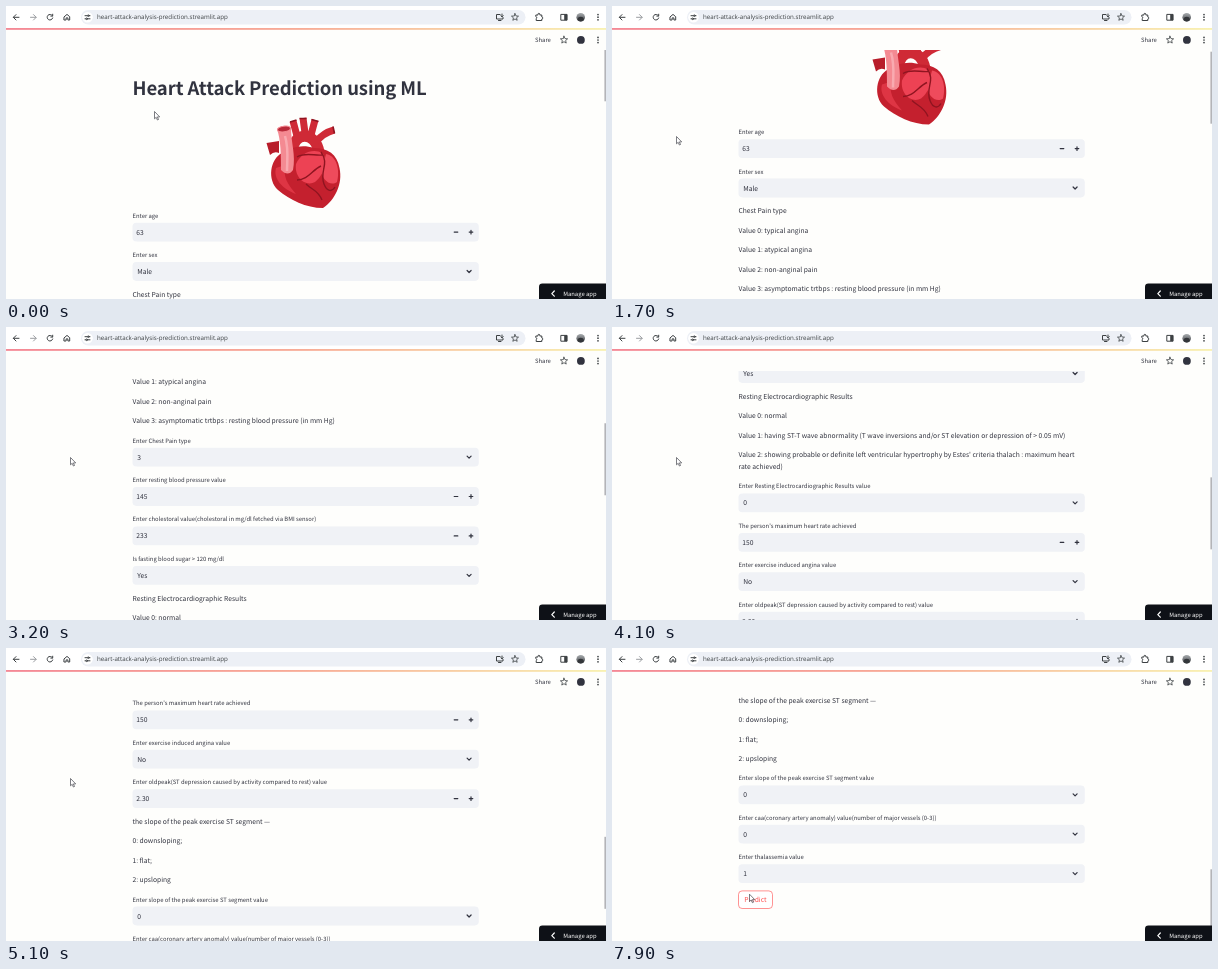
These frames come from a looping animation (600x293 px, 8 s). An HTML page:

```html
<!DOCTYPE html>
<html lang="en">
<head>
<meta charset="utf-8">
<title>Prediction form</title>
<style>
  html, body { margin: 0; width: 100%; height: 100%; overflow: hidden; background: #fefefc; }
  svg { display: block; width: 600px; height: 293px; }
  text {
    font-family: "Noto Sans CJK JP", "Noto Sans CJK SC", "Noto Sans CJK KR", "Open Sans", sans-serif;
    fill: #31333f; text-rendering: geometricPrecision; white-space: pre;
  }
  .h1 { font-size: 18.51px; font-weight: 700; letter-spacing: -.09px; }
  .body { font-size: 6.73px; }
  .label { font-size: 5.89px; }
  .url { font: 6.19px "Open Sans", "Noto Sans", sans-serif; fill: #3c4043; }
  .light { fill: #fff; font-weight: 500; }
  .line { fill: none; stroke: #3c4043; stroke-width: 1; stroke-linecap: round; stroke-linejoin: round; }
  .mark { fill: none; stroke: #31333f; stroke-width: 1.2; stroke-linecap: round; stroke-linejoin: round; }
  #button rect { fill: #fff; stroke: #d9dade; stroke-width: .6; }
  #button.hover rect { stroke: #ff4b4b; }
  #button.hover text { fill: #ff4b4b; }
</style>
</head>
<body>
<svg viewBox="0 0 600 293">
  <defs>
    <linearGradient id="stripe">
      <stop offset="0" stop-color="#f0566a"/>
      <stop offset=".5" stop-color="#f58a6c"/>
      <stop offset="1" stop-color="#f6ec93"/>
    </linearGradient>
    <linearGradient id="photo" x2="0" y2="1">
      <stop offset="0" stop-color="#a9adb0"/>
      <stop offset="1" stop-color="#45484c"/>
    </linearGradient>
  </defs>
  <rect width="600" height="293" fill="#fefefc"/>

  <g id="page">
    <text class="h1" x="126.5" y="89.2">Heart Attack Prediction using ML</text>
    <g id="heart" fill="none" stroke-linecap="butt">
      <path d="M286 146C287 126 309 124 313 146" stroke="#cf2a36" stroke-width="11"/>
      <path d="M291 130L287 115M299 127L297 112M305 129L309 114M310 136Q317 127 328 124" stroke="#cf2a36" stroke-width="7"/>
      <path d="M284 116l6.500-2M293.500 112.500h7M305.500 113.500l7 2M327 120.500l1.500 7" stroke="#8f1420" stroke-width="1.6"/>
      <path d="M260.500 137L273 135V147Q268 145 264 149Z" fill="#b81d2a"/>
      <path d="M276 147C264 153 261 174 272 184C284 194 300 202 317 202C329 194 337 178 333.500 162C331 148 322 142 308 142C295 138 284 142 276 147Z" fill="#c4202e"/>
      <path d="M290 158C295 146 308 142 316 147C323 153 318 169 309 176C300 181 288 172 290 158Z" fill="#ed4254"/>
      <path d="M320 148C331 150 334 164 331 176C324 181 315 173 316 164Z" fill="#ef4b5c"/>
      <path d="M270 162C267 172 276 183 290 188C281 178 277 170 279 159Z" fill="#de3544"/>
      <path d="M315 146C324 158 313 165 318 178C321 186 326 186 329 181M291 174C302 174 306 164 315 160M300 178C306 184 312 184 316 194M291 151C299 146 309 150 316 149" stroke="#8f1420" stroke-width="1.4"/>
      <path d="M271 123C275 134 275 151 275 164Q282 171 287 164C290 149 285 137 285 122Q278 117 271 123Z" fill="#f48a92"/>
      <path d="M279 130C283 143 281 154 281 165" stroke="#f9aab0" stroke-width="2.500"/>
      <ellipse cx="278" cy="123" rx="6.500" ry="2.800" fill="#b92a39" stroke="#f48a92" transform="rotate(-8 278 123)"/>
    </g>
    <g id="form"></g>
    <g id="button">
      <rect x="126.500" y="981.700" width="34" height="17.600" rx="3.600"/>
      <text class="body" x="132.200" y="993">Predict</text>
    </g>
  </g>

  <rect id="thumb" x="598.400" width="1.600" height="72" fill="#b3b4b8"/>
  <rect y="22" width="600" height="22" fill="#fefefc"/>
  <rect width="600" height="22" fill="#fff"/>
  <rect y="22.300" width="600" height="1.300" fill="url(#stripe)"/>

  <rect x="75" y="4" width="444.500" height="14.500" rx="7.250" fill="#edf0f6"/>
  <circle cx="81.500" cy="11.200" r="5.300" fill="#fff"/>
  <text class="url" x="91" y="13.300">heart-attack-analysis-prediction.streamlit.app</text>
  <g class="line">
    <path d="M13 11.300H7.500M10 8.600L7.300 11.300L10 14"/>
    <path d="M24.500 11.300H30M27.500 8.600L30.200 11.300L27.500 14" stroke="#9a9da1"/>
    <path d="M46.300 9.600A2.800 2.800 0 1 0 46.700 12M46.700 8.200V10.100H44.800"/>
    <path d="M58.300 10.700L61 8.400L63.700 10.700V14H61.900V11.900H60.100V14H58.300Z"/>
    <path d="M79 9.700H81M83.500 9.700H84M79 12.800H79.500M82 12.800H84"/>
    <circle cx="82.300" cy="9.700" r=".8"/><circle cx="80.700" cy="12.800" r=".8"/>
    <path d="M494 8.500H490.500V13H497V11.500M492.500 14.500H495M496 8V10.700M494.800 9.700L496 10.900L497.200 9.700"/>
    <path d="M530.200 9H532V8.200A.9 .9 0 0 1 533.800 8.200V9H535.800V11A1 1 0 0 1 535.800 13V14.500H530.200V12.500A.9 .9 0 0 0 530.200 10.800Z"/>
    <rect x="555.200" y="8.400" width="5.800" height="5.800"/>
  </g>
  <rect x="558.200" y="8.400" width="3" height="5.800" fill="#3c4043"/>
  <circle cx="574.700" cy="11.200" r="4.300" fill="url(#photo)"/>
  <path d="M571.500 14A3.200 3.200 0 0 1 577.900 14A4.300 4.300 0 0 1 571.500 14Z" fill="#33363a"/>
  <g id="icons"></g>

  <text class="label" x="529" y="36.200">Share</text>
  <circle cx="574.900" cy="33.900" r="3.900" fill="#31333f"/>

  <path d="M533 293V281Q533 277.600 536.400 277.600H600V293Z" fill="#0e1117"/>
  <path class="mark" d="M548.300 285L545.800 287.600L548.300 290.200" style="stroke:#fff"/>
  <text class="label light" x="557.200" y="290">Manage app</text>

  <path id="cursor" d="M0 0V7.300L1.700 5.800L2.900 8.500L4 8L2.900 5.400H5.200Z" fill="#fff" stroke="#44464c" stroke-width=".7"/>
</svg>
<script>
const $ = id => document.getElementById(id);
const LOOP = 8000, STEP = 100;

// Plain strings are paragraphs; arrays are [label, value, hasStepper].
const fields = [
  ["Enter age", "63", 1],
  ["Enter sex", "Male"],
  "Chest Pain type",
  "Value 0: typical angina",
  "Value 1: atypical angina",
  "Value 2: non-anginal pain",
  "Value 3: asymptomatic trtbps : resting blood pressure (in mm Hg)",
  ["Enter Chest Pain type", "3"],
  ["Enter resting blood pressure value", "145", 1],
  ["Enter cholestoral value(cholestoral in mg/dl fetched via BMI sensor)", "233", 1],
  ["Is fasting blood sugar &gt; 120 mg/dl", "Yes"],
  "Resting Electrocardiographic Results",
  "Value 0: normal",
  "Value 1: having ST-T wave abnormality (T wave inversions and/or ST elevation or depression of &gt; 0.05 mV)",
  "Value 2: showing probable or definite left ventricular hypertrophy by Estes' criteria thalach : maximum heart\nrate achieved)",
  ["Enter Resting Electrocardiographic Results value", "0"],
  ["The person's maximum heart rate achieved", "150", 1],
  ["Enter exercise induced angina value", "No"],
  ["Enter oldpeak(ST depression caused by activity compared to rest) value", "2.30", 1],
  "the slope of the peak exercise ST segment —",
  "0: downsloping;",
  "1: flat;",
  "2: upsloping",
  ["Enter slope of the peak exercise ST segment value", "0"],
  ["Enter caa(coronary artery anomaly) value(number of major vessels (0-3))", "0"],
  ["Enter thalassemia value", "1"]
];

const text = (cls, x, y, s) => `<text class="${cls}" x="${x}" y="${y}">${s}</text>`;

function widget(y, [label, value, stepper]) {
  const mid = y + 16.6;
  const mark = stepper
    ? `M448.200 ${mid}h3.600M463.200 ${mid}h3.600M465 ${mid - 1.8}v3.600`
    : `M461.100 ${mid - 1}l2 2l2 -2`;
  return text("label", 126.5, y + 2.2, label) +
    `<rect x="126.500" y="${mid - 9.4}" width="346.300" height="18.800" rx="3.800" fill="#f0f2f6"/>` +
    text("body", stepper ? 130.3 : 131.2, mid + 2.6, value) +
    `<path class="mark" d="${mark}"/>`;
}

function layout() {
  let y = 209.5, out = "";
  for (const f of fields) {
    if (Array.isArray(f)) {
      out += widget(y, f);
      y += 39.4;
    } else {
      const lines = f.split("\n");
      lines.forEach((s, i) => out += text("body", 126.5, y + 2.5 + i * 12, s));
      y += 19.5 + (lines.length - 1) * 12;
    }
  }
  return out;
}

function star(cx, cy, r) {
  const pts = Array.from({ length: 10 }, (_, i) => {
    const a = i * Math.PI / 5 - Math.PI / 2, k = i % 2 ? r * 0.45 : r;
    return [cx + k * Math.cos(a), cy + k * Math.sin(a)].map(v => v.toFixed(2));
  });
  return `<polygon class="line" points="${pts.join(" ")}" style="stroke-width:.8"/>`;
}

const dots = (cx, cy) => [-2.6, 0, 2.6]
  .map(d => `<circle cx="${cx}" cy="${cy + d}" r=".85" fill="#3c4043"/>`).join("");

$("form").innerHTML = layout();
$("icons").innerHTML = star(509, 11.3, 3.7) + star(558, 34, 3.8) + dots(592, 11.2) + dots(592, 34);

// Rows are [time, value, ...].
const scrollKeys = [
  [900, 0], [1200, 22], [1700, 83.5], [2300, 200], [2700, 264], [3000, 270], [3100, 270],
  [3200, 272.3], [4100, 474.1], [5100, 617.6], [6000, 719.8], [6200, 738.8]
];
const cursorKeys = [
  [0, 148.5, 105.5], [200, 139, 90], [400, 118, 79], [600, 88, 97], [800, 68, 124],
  [900, 64.5, 130.5], [6700, 64.5, 130.5], [6900, 71, 140], [7200, 100, 190],
  [7500, 130, 243], [7600, 134.5, 248], [7900, 137.5, 246.2]
];

function at(keys, t) {
  if (t <= keys[0][0]) return keys[0].slice(1);
  const i = keys.findIndex(k => k[0] >= t);
  if (i < 0) return keys[keys.length - 1].slice(1);
  const a = keys[i - 1], b = keys[i], p = (t - a[0]) / (b[0] - a[0]);
  return a.slice(1).map((v, n) => v + (b[n + 1] - v) * p);
}

function draw(t) {
  const [scroll] = at(scrollKeys, t);
  const [x, y] = at(cursorKeys, t);
  $("page").setAttribute("transform", `translate(0 ${-scroll})`);
  $("thumb").setAttribute("y", 23.3 + scroll * 0.268);
  $("cursor").setAttribute("transform", `translate(${x} ${y})`);
  const top = 981.7 - scroll;
  const over = x > 126.5 && x < 160.5 && y > top && y < top + 17.6;
  $("button").setAttribute("class", over ? "hover" : "");
}

const start = performance.now();
function tick() {
  const t = (performance.now() - start) % LOOP;
  draw(Math.floor(t / STEP) * STEP);
  requestAnimationFrame(tick);
}
tick();
</script>
</body>
</html>
```
